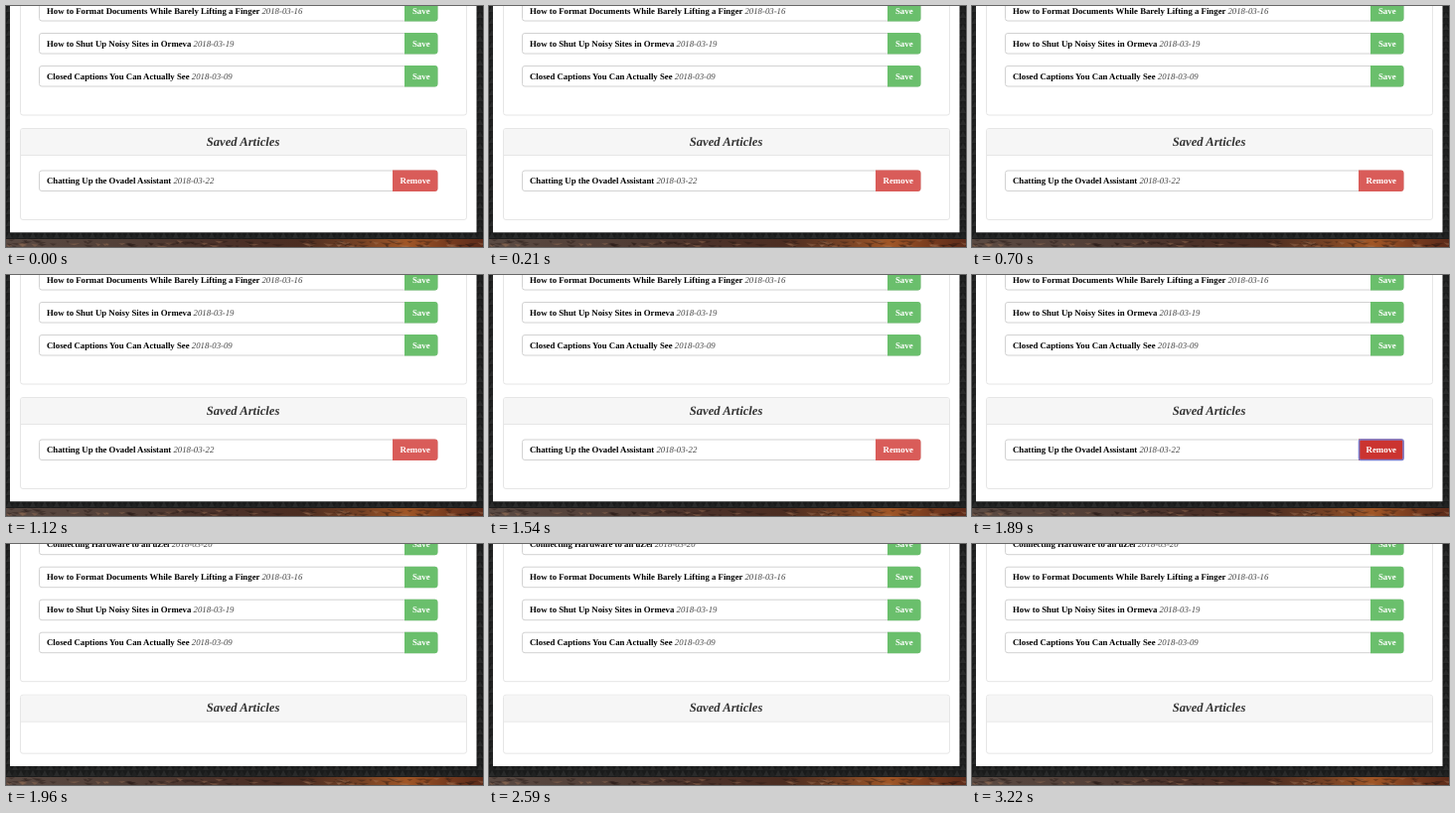
Animation of 480 by 243 pixels, one loop 3.29 s. Source, as an HTML page:

```html
<!DOCTYPE html>
<html lang="en">
<head>
<meta charset="utf-8">
<title>Saved Articles</title>
<style>
html, body { margin: 0; width: 100%; height: 100%; overflow: hidden; background: #1b1d1d; }
svg { display: block; width: 480px; height: 243px; }
text { font: bold 8.78px "Liberation Serif", "Times New Roman", serif; text-rendering: geometricPrecision; }
.date { font-weight: normal; font-style: italic; fill: #444; }
.title { font-size: 12.65px; font-style: italic; fill: #333; text-anchor: middle; }
.btn { fill: #fff; font-size: 8.9px; text-anchor: middle; }
.card { fill: #fff; stroke: #e6e6e6; }
.box { fill: #fff; stroke: #d2d2d2; }
</style>
</head>
<body>
<svg viewBox="0 0 480 243">
  <defs>
    <pattern id="tri" width="12" height="12" patternUnits="userSpaceOnUse">
      <rect width="12" height="12" fill="#1a1b1b"/>
      <path d="M0 6L3 0L6 6ZM6 12L9 6L12 12Z" fill="#292a2a"/>
      <path d="M6 6L9 0L12 6ZM0 12L3 6L6 12Z" fill="#212222"/>
    </pattern>
    <linearGradient id="land">
      <stop offset="0" stop-color="#5a4a43"/>
      <stop offset=".25" stop-color="#523f37"/>
      <stop offset=".45" stop-color="#4b3129"/>
      <stop offset=".62" stop-color="#4c2d21"/>
      <stop offset=".75" stop-color="#784325"/>
      <stop offset=".84" stop-color="#a05626"/>
      <stop offset=".92" stop-color="#7a3d1f"/>
      <stop offset="1" stop-color="#5c2b1a"/>
    </linearGradient>
  </defs>
  <rect width="480" height="243" fill="url(#tri)"/>
  <rect id="page" x="4" y="-9" width="469.5" fill="#fff"/>
  <g id="content">
    <rect class="card" x="14.5" y="-80" width="449" height="190" rx="2.5"/>
    <g id="rows"></g>
    <rect class="card" id="saved" x="14.5" y="123.5" width="449" rx="2.5"/>
    <path d="M15 150V126a2 2 0 0 1 2-2H461a2 2 0 0 1 2 2V150Z" fill="#f6f6f6"/>
    <path d="M15 150.5H463" stroke="#e6e6e6"/>
    <text class="title" x="238.5" y="140.8">Saved Articles</text>
    <g id="savedRow"></g>
  </g>
  <rect y="235" width="480" height="8" fill="url(#land)"/>
  <g id="rocks"></g>
</svg>
<script>
const $ = id => document.getElementById(id);
const LOOP = 3290, HOVER = 1610, FOCUS = 1820, REMOVE = 1960;
const ramp = (t, start, length) => Math.min(1, Math.max(0, (t - start) / length));

function row(y, title, date, label, left, color) {
  return `<rect class="box" x="33.5" y="${y}" width="400.5" height="20.5" rx="2.5"/>
    <text x="41" y="${y + 13.2}">${title} <tspan class="date">${date}</tspan></text>
    <path class="fill" fill="${color}" d="M${left} ${y - .5}H431.5a3 3 0 0 1 3 3v15.5a3 3 0 0 1-3 3H${left}Z"/>
    <text class="btn" x="${(left + 434.5) / 2}" y="${y + 13.2}">${label}</text>`;
}

$("rows").innerHTML = [
  ["Connecting Hardware to an uZel", "2018-03-20"],
  ["How to Format Documents While Barely Lifting a Finger", "2018-03-16"],
  ["How to Shut Up Noisy Sites in Ormeva", "2018-03-19"],
  ["Closed Captions You Can Actually See", "2018-03-09"]
].map(([title, date], i) => row(-38.5 + 33 * i, title, date, "Save", 401, "#6abf6c")).join("");

$("savedRow").innerHTML =
  row(166, "Chatting Up the Ovadel Assistant", "2018-03-22", "Remove", 389, "#d95c59") +
  '<rect id="ring" x="389.5" y="166" width="44.5" height="20.5" rx="1.5" fill="none" stroke="#7b7ccb" stroke-width="1.6"/>';
const remove = $("savedRow").querySelector(".fill");

// Mottled ground along the bottom edge
let seed = 7;
const rnd = () => (seed = seed * 16807 % 2147483647) / 2147483647;
let rocks = "";
for (let i = 0; i < 110; i++) {
  const x = rnd() * 480, y = 235.5 + rnd() * 6, w = 3 + rnd() * 10;
  rocks += `<path d="M${x} ${y}l${w} ${rnd() * 2 - .5}l${-w / 2} 2Z" fill="${rnd() < .65 ? "#1f1512" : "#a87a5c"}" opacity=".35"/>`;
}
$("rocks").innerHTML = rocks;

function draw(now) {
  const t = now % LOOP, gone = t >= REMOVE;
  const hover = ramp(t, HOVER, 140);
  const mix = (a, b) => Math.round(a + (b - a) * hover);
  remove.setAttribute("fill", `rgb(${mix(217, 203)},${mix(92, 52)},${mix(89, 48)})`);
  $("ring").setAttribute("opacity", ramp(t, FOCUS - 35, 70));
  $("savedRow").setAttribute("visibility", gone ? "hidden" : "visible");
  $("content").setAttribute("transform", `translate(0 ${gone ? 28.7 : 0})`);
  $("saved").setAttribute("height", gone ? 59 : 92);
  $("page").setAttribute("height", gone ? 233 : 237.3);
}

const start = performance.now();
function tick() {
  draw(performance.now() - start);
  requestAnimationFrame(tick);
}
tick();
</script>
</body>
</html>
```
